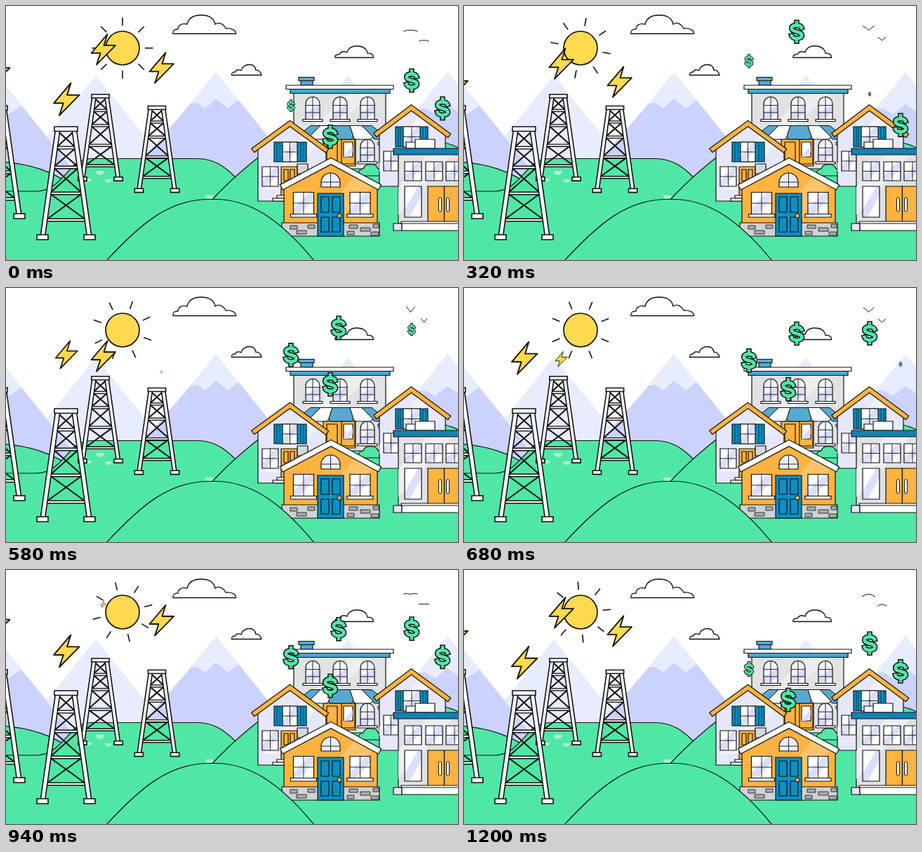
Animation, 644 px wide and 362 px high, one loop 1220 ms. Source, as an HTML page:

```html
<!DOCTYPE html>
<html lang="en">
<head>
<meta charset="utf-8">
<title>Town power</title>
<style>
  html, body { margin: 0; width: 100%; height: 100%; overflow: hidden; background: #fff; }
  svg { display: block; width: 644px; height: 362px; }
</style>
</head>
<body>
<svg id="stage" viewBox="0 0 644 362"></svg>
<script>
const INK = '#111', GREEN = '#50e7a6', ORANGE = '#ffb340', BLUE = '#0a90c4', SKY = '#58a9cf',
      YELLOW = '#ffd94f', LILAC = '#e6e7fa', HAZE = '#e8ecff', DUSK = '#ccd2fe', GREY = '#e0e2e4';

// Drawing helpers, each returns SVG markup
const path = (d, fill = 'none', w = 1.2, extra = '') =>
  `<path d="${d}" fill="${fill}" stroke="${w ? INK : 'none'}" stroke-width="${w}" ${extra}/>`;
const rect = (x, y, w, h, fill = '#fff', sw = 1.2) => path(`M${x} ${y}h${w}v${h}h${-w}z`, fill, sw);
const band = (d, w, fill, line = 1.3, cap = 'square') =>
  [[INK, w + line * 2], [fill, w]].map(([c, s]) =>
    `<path d="${d}" fill="none" stroke="${c}" stroke-width="${s}" stroke-linecap="${cap}"/>`).join('');
const group = (x, y, s, body) => `<g transform="translate(${x} ${y}) scale(${s})">${body}</g>`;

function win(x, y, w, h, cols = 2, rows = 2) {
  let bars = '';
  for (let i = 1; i < cols; i++) bars += `M${x + w * i / cols} ${y}v${h}`;
  for (let i = 1; i < rows; i++) bars += `M${x} ${y + h * i / rows}h${w}`;
  return rect(x, y, w, h, '#fff', 0) +
    path(`M${x} ${y + h * .75}L${x + w * .8} ${y}H${x + w}V${y + h * .3}L${x + w * .3} ${y + h}H${x}z`, '#dcdffc', 0) +
    rect(x, y, w, h, 'none') + path(bars, 'none', .9);
}

function arch(x, y, w, h) {
  const r = w / 2, d = `M${x} ${y + h}V${y + r}a${r} ${r} 0 0 1 ${w} 0V${y + h}z`;
  return path(d, '#f4f5ff', 0) +
    path(`M${x} ${y + h}V${y + h * .7}L${x + w} ${y + h * .35}V${y + h * .7}L${x + w * .3} ${y + h}z`, '#d9ddfb', 0) +
    path(d) + path(`M${x + r} ${y}v${h}M${x} ${y + h * .38}h${w}M${x} ${y + h * .7}h${w}`, 'none', .9);
}

function mountain(x, y, snow = 45) {
  const k = snow / 45;
  return path(`M${x} ${y}l-130 160h260z`, HAZE, 0) +
    path(`M${x - 36 * k} ${y + snow}l${9 * k} -1 ${12 * k} 8 ${15 * k} -14 ${17 * k} 14 ${15 * k} -12 97 120h-264z`, DUSK, 0);
}

// size scales the shape while the line weight stays the same
function tower(x, y, size) {
  const ys = [7, 30, 58, 95, 133], edge = v => 11 + (v - 7) * .141;
  const line = 1.6 / size;
  let s = '', cross = '';
  for (let i = 0; i < 4; i++) {
    const a = ys[i], b = ys[i + 1], p = edge(a), q = edge(b);
    cross += `M${-p} ${a}L${q} ${b}M${p} ${a}L${-q} ${b}`;
  }
  s += path(cross, 'none', line * 1.25);
  for (const v of ys.slice(1)) s += band(`M${-edge(v)} ${v}H${edge(v)}`, 2.2, '#fff', line * .85, 'butt');
  s += band('M-12 6L-33 155', 4.8, '#fff', line, 'butt') + band('M12 6L33 155', 4.8, '#fff', line, 'butt');
  s += rect(-16.5, 0, 33, 6.5, '#fff', line) +
    rect(-41.5, 154, 16, 7, '#fff', line) + rect(25.5, 154, 16, 7, '#fff', line);
  return group(x, y, size, s);
}

function land() {
  const pebble = (x, y, w = 5) => path(`M${x - w} ${y}h${w * 2}a${w} ${w} 0 0 1 ${-w * 2} 0z`, '#a9f2d3', 0);
  return path('M128 99l-105 130h210z', HAZE, 0) + path('M487 99l-80 100h160z', HAZE, 0) +
    mountain(-16, 94, 53) + mountain(299, 94) + mountain(629, 94, 53) +
    path('M-2 222.500C34 225 64 235 92 254V370H-2z', GREEN) +
    path('M-2 264H44C70 263 80 243 98 226Q108 217.500 122 217.500H272C297 217.500 312 229 328 245V370H-2z', GREEN) +
    path('M290 280C310 258 334 236 358 217Q400 195 480 190H600Q640 196 650 206V370H290z', GREEN) +
    pebble(134, 235, 6) + pebble(118, 246, 4) + pebble(146, 247) + pebble(290, 270, 6);
}

function clouds() {
  return path('M238 39.500H327.500C328 34 320 31 313 32C309 24 302 23 298 26C296 16 287 13 278 13C267 13 260 18 258 26C250 24 245 28 245 33Q237 33 238 39.500z', '#fff', 1.3) +
    path('M321.500 98.500H364C363 93 359 91 356 91.500C355 85 351 83.500 347 83.500C341 83.500 336 87 335 92Q329 89 326.500 94Q321 94 321.500 98.500z', '#fff', 1.3) +
    path('M469 73.500H523.500C524 69 520 67 515 67.500C514 60 507 57 499 57C492 57 487 61 486 66Q478 63 475 69Q468 69 469 73.500z', '#fff', 1.3);
}

// Stripes spread out from the middle of the shop front
function awning() {
  const mid = 477.5, top = [-43.5, -29.5, -12.5, 12.5, 29.5, 43.5], foot = [-63, -45, -17.5, 17.5, 45, 63];
  let s = '';
  for (let i = 0; i < 5; i++) {
    const a = mid + foot[i], b = mid + foot[i + 1];
    s += path(`M${mid + top[i]} 170.500H${mid + top[i + 1]}L${b} 186q-1 4 -4 4H${a + 4}q-4 0 -4 -4z`, i % 2 ? '#fff' : SKY, 1);
  }
  return s;
}

function store() {
  let s = rect(410, 122, 131, 110, GREY) + path('M490 124h32l-50 46h-32z', '#edeef0', 0);
  s += rect(420, 106, 17, 7, SKY) + rect(417, 101.500, 22, 5, SKY) +
    rect(405, 118.500, 142, 6, '#4ba5d2') + rect(399, 113, 153, 5.500);
  for (const x of [427, 466, 505]) s += arch(x, 129.500, 20, 32) + rect(x - 4, 161.500, 28, 3);
  s += rect(452, 190, 46, 38, ORANGE) + rect(478, 190, 19, 35, ORANGE) + rect(481, 194, 13, 21, '#fff') +
    path('M481 214l13 -15v9l-7 7h-6z', '#d9ddfb', 0) + rect(457, 194, 15, 28, ORANGE) + arch(505, 190, 20, 32) +
    rect(501, 222, 28, 3);
  return s + awning() + path('M530 194h5v4h-5zm1 7h4v5', 'none', 1) +
    path('M502 242q-1 -9 7 -10q3 -8 11 -6q8 -1 10 6q8 0 7 10z', GREEN, 1.1);
}

function leftHouse() {
  return path('M359 278V202L404 169L456 205V278z', LILAC) +
    path('M424 182l20 14 -54 66h-24z', '#f2f2fd', 0) +
    rect(382, 194, 46, 28, BLUE) + win(394, 194, 21, 28) + path('M386 194v28M390 194v28M420 194v28M424 194v28', 'none', .7) +
    win(365, 229, 23, 28) + rect(392, 229, 23, 49, ORANGE) + rect(396, 233, 6, 16, ORANGE) + rect(405, 233, 6, 16, ORANGE) +
    rect(415, 225, 15, 14, '#d5d7dc') + rect(386, 270, 14, 4) + rect(380, 274, 20, 4) +
    band('M354.500 204L404.500 167.500L455 204.500', 5.500, ORANGE, 1.2);
}

function rightHouse() {
  return path('M532 257V181L577 147L626 182V257z', LILAC) +
    path('M588 156l14 10 -56 70h-14v-12z', '#f2f2fd', 0) +
    rect(555, 172, 46, 29, BLUE) + win(566, 172, 24, 29) + path('M559 172v29M562 172v29M594 172v29M598 172v29', 'none', .7) +
    win(538, 207, 21, 28) + band('M528.500 182L577.500 145L629 183', 5.500, ORANGE, 1.2);
}

function shop() {
  let s = rect(559, 210, 90, 100, GREY) + path('M600 212h36l-77 86v-40z', '#eeeff1', 0);
  s += rect(570, 194, 14, 9) + rect(583, 190, 28, 13) + rect(552, 203, 95, 9, '#1482b2');
  for (const x of [568, 598, 627]) s += win(x, 222, 24, 27);
  s += win(568, 257, 24, 44, 1, 1);
  for (const x of [601, 624.500]) s += rect(x, 257, 23.500, 51, ORANGE);
  for (const x of [616.500, 627.500]) s += `<rect x="${x}" y="273" width="4" height="20" rx="2" fill="#fff" stroke="${INK}"/>`;
  return s + rect(563, 307, 86, 6) + rect(552, 310, 12, 10, LILAC) + rect(564, 310, 84, 10);
}

function frontHouse() {
  let s = path('M396 312V256L463 221L529 256V312z', ORANGE) +
    path('M497 242l26 14 -50 52h-30z', '#ffc468', 0) + rect(393, 309, 139, 19, '#cfd2d4');
  for (const [x, y, w] of [[414, 320, 14], [430, 312, 10], [405, 313, 10], [486, 321, 10], [489, 312, 12], [505, 316, 14], [520, 322, 11], [523, 311, 8]])
    s += rect(x, y, w, 5, '#a9adb1', .8);
  for (const x of [409.500, 490]) s += win(x, 265.500, 29, 31) + rect(x - 4, 296.500, 37, 4.500);
  s += path('M449 258v-7a13.500 13 0 0 1 27 0v7z', '#eceefe') + path('M462.500 238v20M449 251h27', 'none', .9);
  s += rect(444, 267, 37, 61, BLUE);
  for (const x of [449, 465]) s += rect(x, 272, 11, 22, BLUE) + rect(x, 301, 11, 21, BLUE);
  return s + `<circle cx="475" cy="299" r="3" fill="${ORANGE}" stroke="${INK}"/>` +
    band('M396 256.500L463 221L529 256.500', 7, '#fff', 1.2);
}

const BOLT = path('M6 -22L1 -6H17.500L-9.500 21.500L-4 5H-17z', YELLOW, 1.8, 'stroke-linejoin="round"');
const DOLLAR = band('M0 -13.500V-11M0 11V13.500', 4.600, GREEN, 1.5) +
  band('M7 -5.800C5.500 -10 -7.200 -11 -7.200 -5C-7.200 1.200 7.400 -1.200 7.400 5.200C7.400 11 -6 10.500 -7.300 5.600', 4.800, GREEN, 1.5) +
  `<path d="M0 -13V-10M0 10V13" stroke="${GREEN}" stroke-width="4.6"/>`;

// x, first y, start time, scale
const bolts = [[-12, 63.500, 640, 1], [138.500, 48, 900, 1], [221.500, 64.300, 740, 1], [86, 90, 435, 1.060]];
const dollars = [[474, 23, 60, 1], [406, 74.500, 222, 1], [462, 127, 370, 1], [578, 55.500, 490, 1], [622, 107.500, 643, 1]];

let rays = '';
for (let a = 0; a < 360; a += 45) rays += `<path d="M0 -32V-43.500" transform="rotate(${a})" stroke="${INK}" stroke-width="1.6"/>`;

const stage = document.getElementById('stage');
stage.innerHTML = land() + clouds() +
  `<g id="rays">${rays}</g><circle cx="166" cy="60" r="24" fill="${YELLOW}" stroke="${INK}" stroke-width="1.7"/>` +
  tower(-14.500, 142, 1) + tower(134.500, 126, .765) + tower(215, 142.500, .765) +
  store() + leftHouse() + rightHouse() + shop() + frontHouse() +
  path('M143 363C192 310 232 275.500 290 275.500H298C345 275.500 388 301 439 363z', GREEN) +
  tower(85.500, 172, 1) +
  bolts.map(() => `<g class="drop">${BOLT}</g>`).join('') +
  dollars.map(() => `<g class="drop">${DOLLAR}</g>`).join('') +
  '<path class="bird"/><path class="bird"/>';

const LOOP = 1220, LIFE = 1080;
const drops = [...bolts.map(b => [...b, 56]), ...dollars.map(d => [...d, 71])];
const dropEls = [...stage.querySelectorAll('.drop')];
const birdEls = [...stage.querySelectorAll('.bird')];
const raysEl = document.getElementById('rays');
birdEls.forEach(b => { b.setAttribute('fill', 'none'); b.setAttribute('stroke', INK); });

function draw(t) {
  raysEl.setAttribute('transform', `translate(166 60) rotate(${t / 30})`);

  drops.forEach(([x, y, start, size, fall], i) => {
    const age = (t - start + LOOP) % LOOP, u = Math.min(age / LIFE, 1);
    const grow = Math.max(0, Math.min(1, age / 170, (LIFE - age) / 160));
    const eased = (u + u * u * (3 - 2 * u)) / 2;
    dropEls[i].setAttribute('transform', `translate(${x} ${y + fall * eased}) scale(${grow * size})`);
    dropEls[i].setAttribute('visibility', grow ? 'visible' : 'hidden');
  });

  const flap = -2.3 - 6 * Math.cos((t - 520) / 1400 * 2 * Math.PI);
  const reach = Math.sqrt(105 - flap * flap);
  [[576.500, 34.500, 1], [595.500, 49, .7]].forEach(([x, y, s], i) => {
    const dx = reach * s, dy = flap * s, lift = -1.5 * s;
    birdEls[i].setAttribute('d',
      `M${x - dx} ${y + dy}Q${x - dx * .45} ${y + dy * .3 + lift} ${x} ${y}Q${x + dx * .45} ${y + dy * .3 + lift} ${x + dx} ${y + dy}`);
  });
}

function tick() {
  const t = performance.now() % LOOP;
  draw(Math.floor(t / 20) * 20);
  requestAnimationFrame(tick);
}
tick();
</script>
</body>
</html>
```
